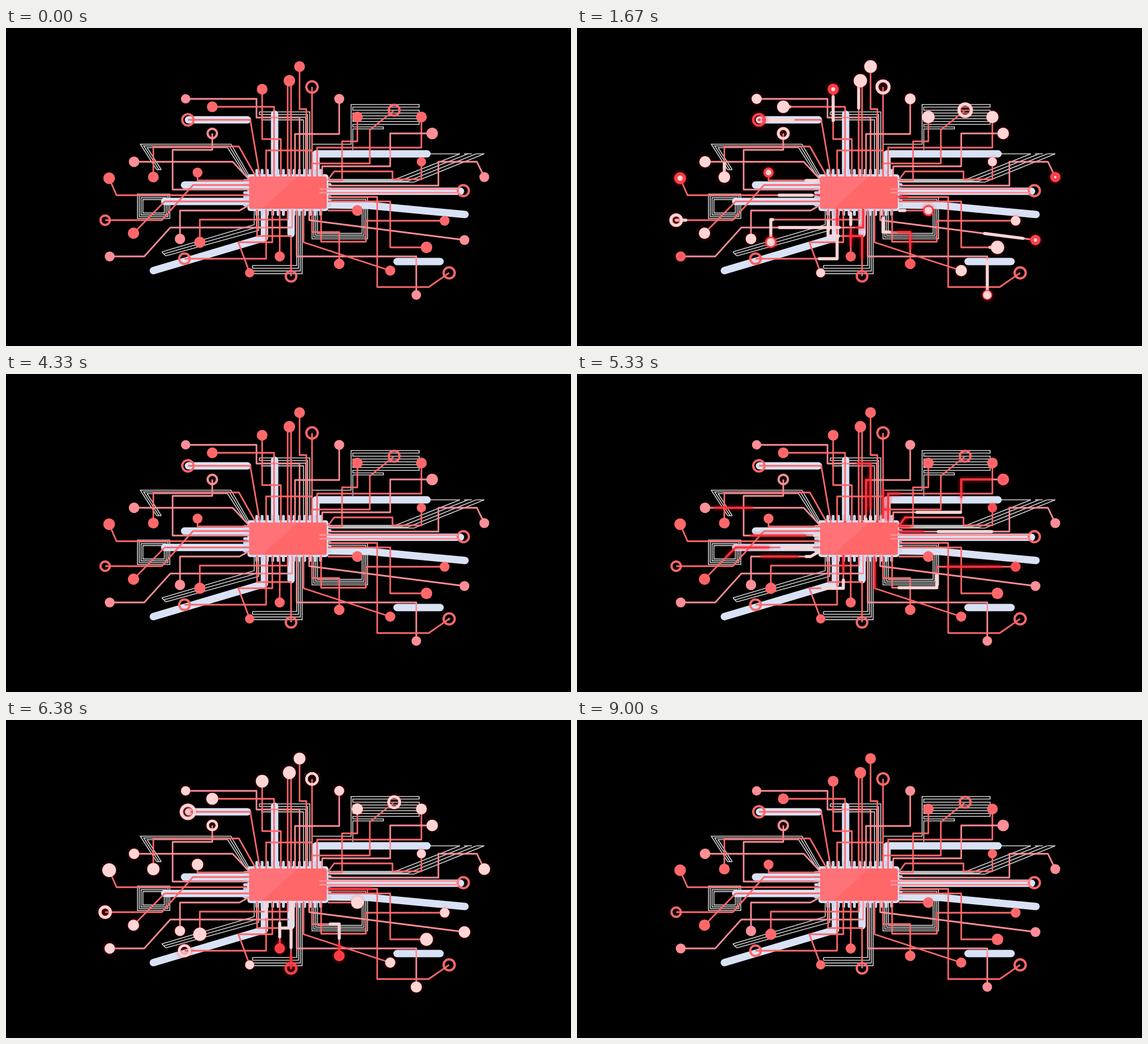
An HTML page for the animation above (9040 ms loop, 997 px wide and 561 px high).

```html
<!DOCTYPE html>
<html lang="en">
<head>
<meta charset="utf-8">
<title>Circuit pulses</title>
<style>
  html, body { margin: 0; width: 100%; height: 100%; overflow: hidden; background: #000; }
  svg { display: block; width: 100vw; height: 100vh; }
  path, circle { fill: none; }
  #traces { stroke: #d2d2d2; stroke-width: 1.6; }
  #bars { stroke: #d9e2f5; stroke-width: 13; stroke-linecap: round; stroke-linejoin: round; }
  #pins { stroke: #c8d4ea; stroke-width: 5; stroke-linecap: round; }
  #wires, #over { stroke-width: 2.8; stroke-linejoin: round; }
  #reds { stroke: #ff323d; stroke-width: 3.6; stroke-linecap: round; }
  #pales { stroke: #ffd5d5; stroke-width: 5.4; stroke-linecap: round; stroke-linejoin: round; }
  #reds, #glows { filter: drop-shadow(0 0 3.5px #f01824); }
</style>
</head>
<body>
<svg viewBox="0 0 997 561" preserveAspectRatio="none">
  <g id="traces"></g>
  <g id="bars"></g>
  <g id="pins"></g>
  <rect x="426" y="258" width="143" height="65" rx="5" fill="#d3dcf0"/>
  <g id="wires"></g>
  <g id="reds"></g>
  <g id="pales"></g>
  <g id="nodes"></g>
  <g id="glows"></g>
  <g id="lights"></g>
  <rect x="429" y="262" width="137" height="57" rx="4" fill="#ff6769"/>
  <path d="M433 262H515L452 319H433Q429 319 429 315V266Q429 262 433 262" style="fill:#ff7277"/>
  <g id="over"></g>
</svg>
<script>
const CYCLE = 4520, TRAVEL = 640, RED = '#ff686b', PINK = '#ff8e96', PALE = '#ffd5d5';
const clamp = x => Math.max(0, Math.min(1, x));
const smooth = x => (x = clamp(x), x * x * (3 - 2 * x));

function add(layer, tag, attrs) {
  const el = document.createElementNS('http://www.w3.org/2000/svg', tag);
  for (const key in attrs) el.setAttribute(key, attrs[key]);
  return document.getElementById(layer).appendChild(el);
}
const line = (layer, d, extra) => add(layer, 'path', { d, ...extra });

// Thin grey traces
for (let i = 0; i < 3; i++) {
  line('traces', `M${266 + 4 * i} 250L${237 + 6 * i} ${205 + 3 * i}H${397 - 3 * i}L${431 - 3 * i} 264`);
  line('traces', `M${275 + 3.5 * i} ${395 + 3.5 * i}L${438 + 4 * i} ${347 + 5 * i}V320`);
}
line('traces', 'M266 250H274M275 395L282 402');
for (let i = 0; i < 4; i++) {
  const k = 3.2 * i;
  line('traces', `M${232 + k} ${293 + k}H${289 - k}V${336 - k}H${232 + k}Z`);
  line('traces', `M435 ${419 + 4.8 * i}H${513 + k}V320`);
  line('traces', `M${540 + k} 320V${372 - k}H${638 - k}V${299 + k}H568`);
  line('traces', `M${i < 2 ? 447 : 450} ${148 + 4.7 * i}H${536 - 3.7 * i}V262`);
  line('traces', `M570 ${267 + 1.6 * i}H${687 + 11 * i}L${801 + 14.3 * i} 222`);
}
line('traces', 'M435 419V424M435 429V433M447 148V153M747 222H801M808 222H822M830 222H844');
line('traces', 'M540 205H609V135H729V139.5H612V145H729V150H612V155H729V160H612V165H729V170H612V174.5H666V178H612V215');

// Wide light bars
for (const d of ['M322 162H426', 'M474 152V256', 'M547 256V222H743', 'M315 277H426', 'M280 306H426',
  'M568 288H802', 'M568 312L640 313L810 329', 'M456 325V370L260 428', 'M503 322V363', 'M690 412H766'])
  line('bars', d);

// Chip pins
for (let i = 0; i < 13; i++) line('pins', `M${442.5 + 9.4 * i} 251V329`);
for (let i = 0; i < 7; i++) line('pins', `M421 ${269 + 7.2 * i}H572`);

const pulses = [], lamps = [];

function lamp(x, y, r, color, { lit, ring, back }) {
  const shape = (layer, paint) => add(layer, 'circle', ring
    ? { cx: x, cy: y, r, stroke: paint, 'stroke-width': 4 }
    : { cx: x, cy: y, r, style: 'fill:' + paint });
  shape('nodes', color);
  if (lit) lamps.push({ r, lit, ring, warmUp: back ? 60 : 280, glow: shape('glows', '#ff3d47'), light: shape('lights', PALE) });
}

// A wire runs from chip to node; "back" sends its pulse from node to chip.
function wire(d, r, arrive, o = {}) {
  const { color = RED, travel = TRAVEL, trail = .2, lit = arrive - 110 } = o;
  const base = line('wires', d, { stroke: color });
  const end = base.getPointAtLength(base.getTotalLength());
  const part = layer => line(layer, d, { pathLength: 1 });
  pulses.push({ red: part('reds'), pale: part('pales'), start: arrive - .94 * travel, travel, trail, back: o.back });
  if (r) lamp(end.x, end.y, r, color, { ...o, lit });
}
const back = { back: true }, ring = { ring: true }, pink = { color: PINK };

// Top
wire('M518 262V158H442V125H317', 8.3, 1350, pink);
wire('M473 262V139H364', 9.5, 1590);
wire('M448 262L431 162H321', 10, 1730, ring);
wire('M485 262V196H452V108', 9.5, 1735);
wire('M497 262V93', 0, 1730);
wire('M503 262V93H500', 10.2, 1590);
wire('M530 262V143H518V68', 9.5, 1575);
wire('M540 262V104', 10, 1350, ring);
wire('M510 262V187H588V125', 8.8, 1350, pink);
wire('M570 269H593V200H620V157', 9.5, 1490);
wire('M540 262V239H642V180L685 145', 9.5, 1480, ring);
wire('M549 262V211H733V157', 9.5, 1410);
wire('M558 262V244H678V186H752', 10.3, 1090, pink);
line('wires', 'M459 262V216H540', { stroke: RED });

// Left
wire('M430 285H294V215H364V186', 8.3, 1340, { ...ring, ...pink });
wire('M430 268L400 236H226', 9.3, 1350, { ...back, ...pink });
wire('M441 262L411 209H260V263', 9.5, 1622);
wire('M430 269H338V255', 8.7, 1710, back);
wire('M430 295H195L182 265', 10.3, 1725, back);
wire('M430 277H330L275 339H175', 8.3, 1600, ring);
wire('M430 306H280L225 362', 10, 1180);
wire('M430 312L412 322H307V372', 9.2, 1250, pink);

// Bottom
wire('M505 320V352H290L244 403H183', 8.7, 1815, { ...back, ...pink });
wire('M497 320V338H342V378', 10, 1690);
wire('M459 320V407H315', 9.3, 1830, { ...back, ...ring });
wire('M470 320V378H410L430 432', 8.2, 980, back);
wire('M483 320V403', 9, 2030);
wire('M443 320V367H503V438', 9.3, 2010, ring);
wire('M513 320V403H724V471', 8.5, 1670, pink);
wire('M525 320V378L678 428', 9, 1400);
wire('M540 320V360H588V416', 9.3, 2014);
wire('M535 320V339L809 374', 8.7, 1740, pink);
wire('M556 320V377H635V340H774', 8.7, 1090);

// Right
wire('M568 268L579 253H682V267H733V236', 8.2, 1480, { lit: 980 });
wire('M568 278H763V236H831L844 263', 8.7, 960, { ...back, ...pink, lit: 1640 });
wire('M568 306H678V387H742', 10.2, 1620, { travel: 420, lit: 1480 });
wire('M568 298H655V457H746L782 432', 9.8, 2930, { ...ring, travel: 1100, trail: .03, lit: 2740 });
wire('M568 322H620', 9.5, 1690, back);
line('over', 'M553 284H800M553 290.5H800', { stroke: PINK });
lamp(807, 287, 9.8, RED, ring);

function segment(el, from, to, reverse) {
  const a = smooth(from), b = smooth(to), shown = b - a > .004;
  el.style.display = shown ? '' : 'none';
  if (!shown) return;
  el.style.strokeDasharray = `${b - a} 3`;
  el.style.strokeDashoffset = reverse ? b - 1 : -a;
}

function lightScale(age) {
  if (age <= 0) return 0;
  if (age < 220) return 1.18 * Math.sin(age / 220 * Math.PI / 2);
  return (1.18 - .22 * smooth((age - 220) / 450)) * (1 - smooth((age - 1150) / 600));
}
function glowLevel(age, warmUp) {
  return .8 * clamp(1 + age / warmUp) * (1 - .7 * smooth((age - 200) / 700)) * (1 - smooth((age - 1000) / 500));
}

function draw(time) {
  const t = time % CYCLE;
  for (const p of pulses) {
    const u = (t - p.start) / p.travel;
    segment(p.red, u + .07, u + .32, p.back);
    segment(p.pale, u - p.trail, u, p.back);
  }
  for (const l of lamps) {
    const age = t - l.lit, k = lightScale(age), glow = glowLevel(age, l.warmUp);
    l.light.style.display = k > .03 ? '' : 'none';
    l.light.setAttribute('r', l.r * k);
    if (l.ring) l.light.setAttribute('stroke-width', 4.6 * k);
    l.glow.style.display = glow > .01 ? '' : 'none';
    l.glow.style.opacity = glow;
  }
}

const began = performance.now();
function tick() {
  draw(performance.now() - began);
  requestAnimationFrame(tick);
}
tick();
</script>
</body>
</html>
```
